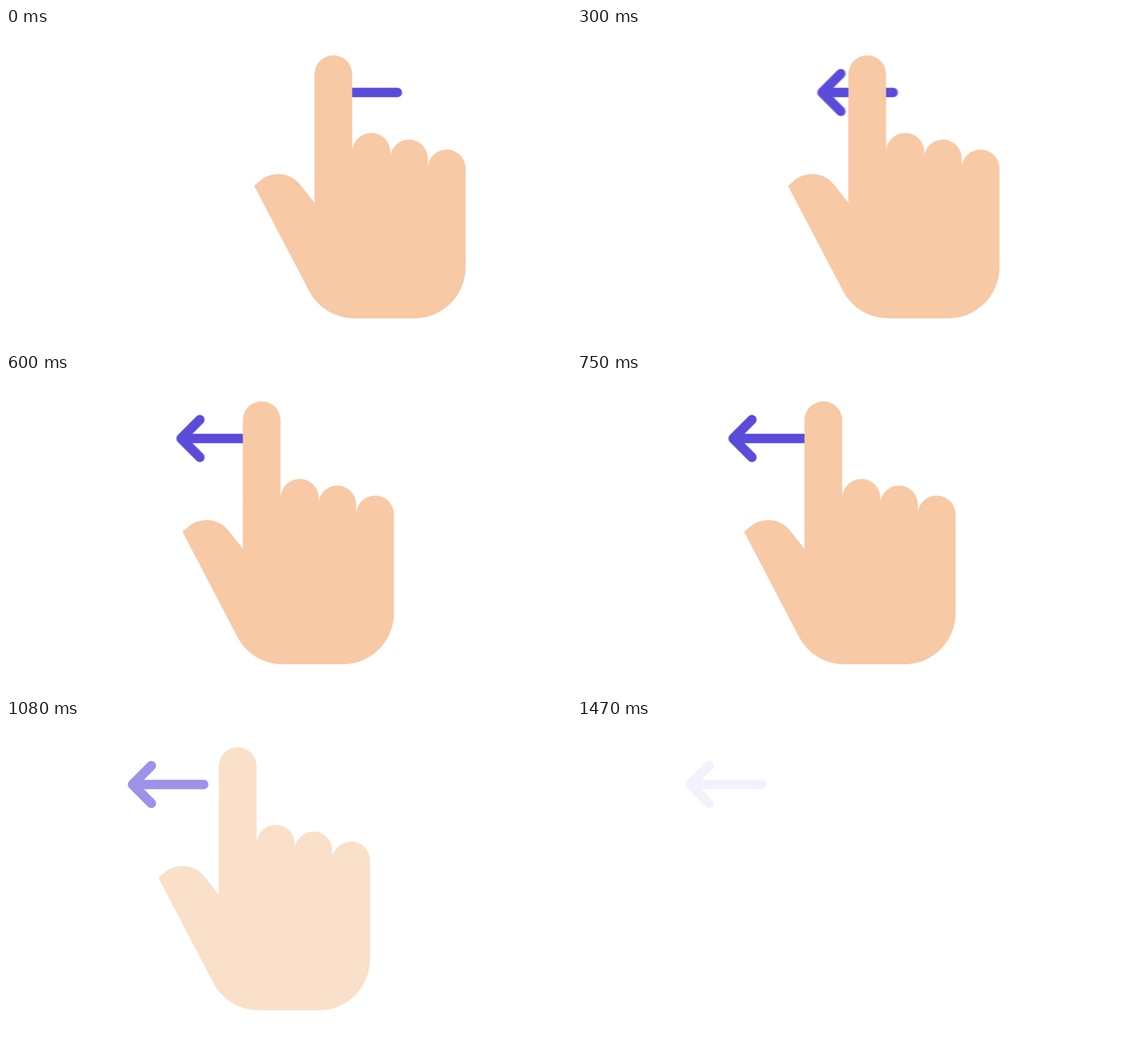
An HTML page with a canvas that plays this animation: 960x540 px, repeating every 1.77 s.

```html
<!DOCTYPE html>
<html lang="en">
<head>
<meta charset="utf-8">
<title>Swipe left</title>
<style>
  html, body { margin: 0; width: 100%; height: 100%; overflow: hidden; background: #fff; }
  canvas { display: block; }
</style>
</head>
<body>
<canvas id="stage" width="960" height="540"></canvas>
<script>
const WIDTH = 960, HEIGHT = 540;
const LOOP = 1770, STEP = 30, LAST = 1470;
const SHUTTER = 10, SAMPLES = 6;
const SKIN = [247, 201, 165], VIOLET = [91, 75, 219];

const stage = document.getElementById('stage').getContext('2d');
const layer = document.createElement('canvas');
layer.width = WIDTH;
layer.height = HEIGHT;
const ctx = layer.getContext('2d');

const clamp = (value, low, high) => Math.min(high, Math.max(low, value));

// Steady swipe, then a quadratic slow-down to rest
function arrowTravel(t) {
  const brake = 550, rest = 1500, reach = 235, glide = 117.5;
  if (t < brake) return reach * t / brake;
  const left = 1 - (t - brake) / (rest - brake);
  return reach + glide * (1 - left * left);
}

const handTravel = t => 0.494 * arrowTravel(t);

function fade(t) {
  const u = clamp((t - 780) / (LAST - 780), 0, 1);
  return (1 + Math.cos(Math.PI * u)) / 2;
}

const tint = (rgb, opacity) =>
  `rgb(${rgb.map(c => Math.round(255 + (c - 255) * opacity))})`;

function drawArrow(x, color) {
  ctx.strokeStyle = color;
  ctx.lineWidth = 16;
  ctx.lineCap = ctx.lineJoin = 'round';
  ctx.beginPath();
  ctx.moveTo(x + 32, 77.5);
  ctx.lineTo(x, 109.5);
  ctx.lineTo(x + 32, 141.5);
  ctx.moveTo(x, 109.5);
  ctx.lineTo(x + 121, 109.5);
  ctx.stroke();
}

function drawHand(dx, color) {
  ctx.save();
  ctx.translate(dx, 0);
  ctx.fillStyle = color;
  ctx.beginPath();
  // Thumb and index finger
  ctx.moveTo(422, 268);
  ctx.arc(462.8, 295.4, 47.4, -2.31, -0.668);
  ctx.lineTo(524.5, 297);
  ctx.arc(556.5, 78.5, 32, Math.PI, 0);
  // Folded fingers
  ctx.lineTo(588.5, 210.5);
  ctx.arc(621, 210.5, 32.3, Math.PI + 0.08, 0);
  ctx.lineTo(653.3, 219);
  ctx.arc(685, 221.5, 32, Math.PI + 0.08, 0);
  ctx.lineTo(717, 237);
  ctx.arc(749, 238.7, 32.2, Math.PI + 0.08, 0);
  // Palm
  ctx.arcTo(781.2, 493, 690, 493, 87);
  ctx.arcTo(539.6, 493, 422, 268, 86);
  ctx.closePath();
  ctx.fill();
  ctx.restore();
}

function drawScene(t, violet, skin) {
  ctx.fillStyle = '#fff';
  ctx.fillRect(0, 0, WIDTH, HEIGHT);
  drawArrow(544.5 - arrowTravel(t), violet);
  drawHand(-handTravel(t), skin);
}

// A running average of nearby moments gives the motion blur
function render(t) {
  const violet = tint(VIOLET, Math.max(0.08, fade(t)));
  const skin = tint(SKIN, fade(t));
  for (let i = 0; i < SAMPLES; i++) {
    const shift = ((i + 0.5) / SAMPLES - 0.5) * SHUTTER;
    drawScene(clamp(t + shift, 0, LAST), violet, skin);
    stage.globalAlpha = 1 / (i + 1);
    stage.drawImage(layer, 0, 0);
  }
}

function tick(now) {
  const t = Math.floor((now % LOOP + 1) / STEP) * STEP;
  render(Math.min(t % LOOP, LAST));
  requestAnimationFrame(tick);
}

render(0);
requestAnimationFrame(tick);
</script>
</body>
</html>
```
